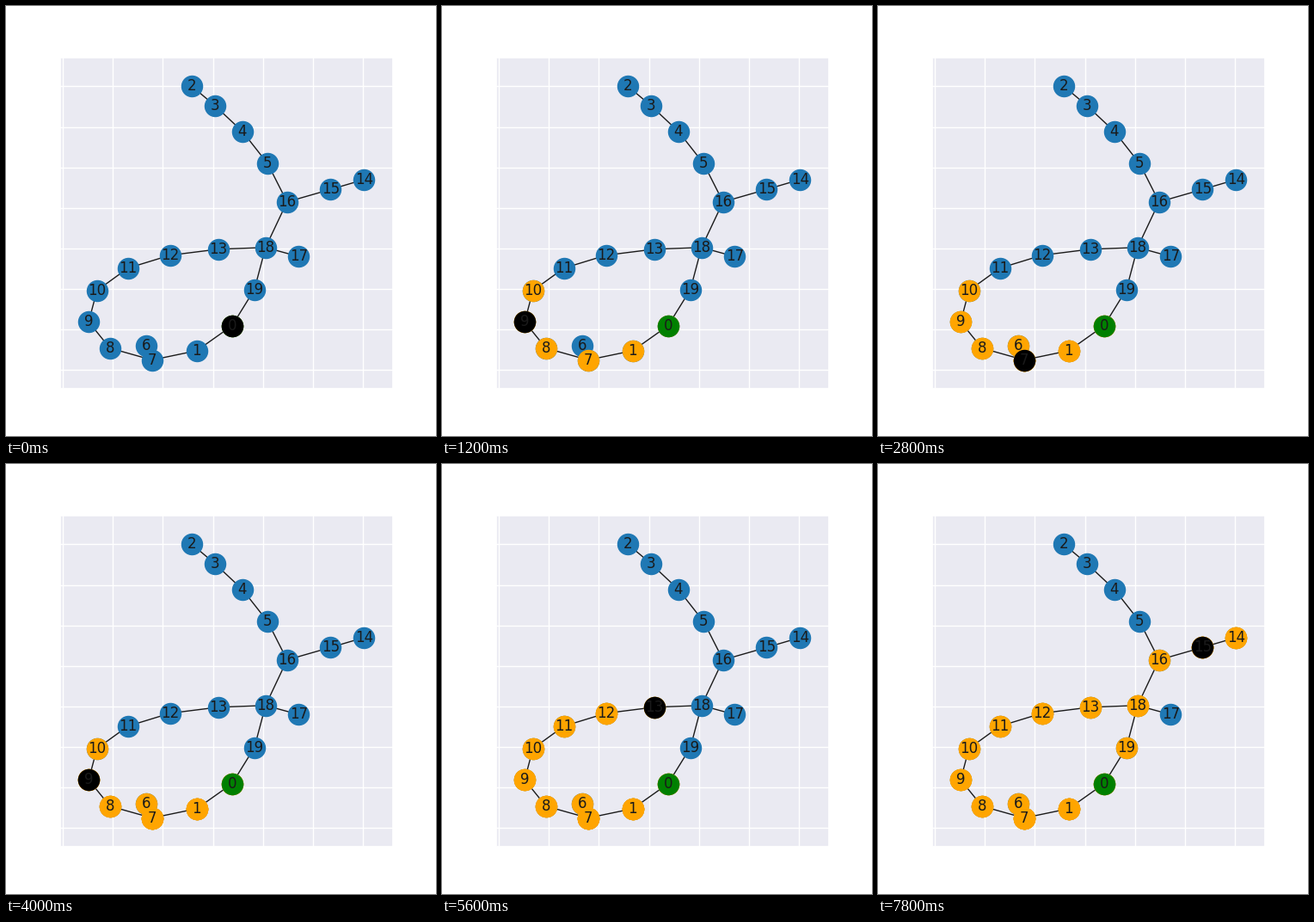
Recreate the animation shown at these times as a matplotlib script. Size 500 by 500 pixels, loop 8000 ms.

```python
import matplotlib.pyplot as plt
import numpy as np
from matplotlib.animation import FuncAnimation

# Graph layout: node centres in stage pixels, y pointing down
NODES = np.array([
    (262.8, 371.8), (221.8, 400.8), (216.3, 93.4), (242.8, 115.8),
    (274.8, 145.8), (304.3, 183.3), (163.3, 395.3), (169.8, 411.6),
    (120.8, 397.8), (96.1, 367.3), (105.8, 330.8), (141.8, 304.8),
    (190.8, 289.8), (246.8, 282.8), (416.4, 201.8), (377.3, 213.3),
    (326.8, 227.8), (340.3, 291.3), (301.8, 280.8), (288.8, 329.8),
])
COUNT = len(NODES)

# Neighbours by number are linked, except after a chain's end
CHAIN_ENDS = {1, 5, 13, 16}
EDGES = [(i, i + 1) for i in range(COUNT - 1) if i not in CHAIN_ENDS]
EDGES += [(0, 19), (1, 7), (5, 16), (13, 18), (16, 18)]

# Nodes where the walker picks a new heading
TURNS = [0, 10, 0, 6, 1, 7, 1, 10, 12, 11, 13, 12, 19, 14, 15, 14, 15, 14, 15]

INK = "#1a1a1a"


def shortest(a, b):
    """Breadth-first path from a to b, without a itself."""
    paths = [[a]]
    seen = {a}
    for path in paths:
        if path[-1] == b:
            return path[1:]
        for edge in EDGES:
            if path[-1] in edge:
                nxt = sum(edge) - path[-1]
                if nxt not in seen:
                    seen.add(nxt)
                    paths.append(path + [nxt])


walk = TURNS[:1]
for a, b in zip(TURNS, TURNS[1:]):
    walk += shortest(a, b)
walk = walk[:40]

plt.rcParams["font.family"] = "DejaVu Sans"
fig = plt.figure(figsize=(5, 5), dpi=100, facecolor="white")
ax = fig.add_axes([0.125, 0.11, 0.775, 0.77], facecolor="#eaeaf2")
ax.set(xlim=(62.5, 450), ylim=(445, 60), xticks=[], yticks=[])
for spine in ax.spines.values():
    spine.set(color="white", linewidth=1.25)

grid = dict(color="white", lw=1, snap=False, zorder=0.5)
for i in range(7):
    ax.axvline(round(66 + 58.2 * i) + 0.5, **grid)
for i in range(8):
    ax.axhline(round(93.45 + 47.1 * i) + 0.5, **grid)

for edge in EDGES:
    ax.plot(*NODES[list(edge)].T, color=INK, lw=1, zorder=1)
for i, (x, y) in enumerate(NODES):
    ax.text(x, y, str(i), size=12, color=INK,
            ha="center", va="center", zorder=3)


def dots(ids, color):
    return ax.scatter(*NODES[ids].T, s=300, color=color, zorder=2)


dots(list(range(COUNT)), "#1f78b4")
visited = dots(walk[:1], "orange")
dots(walk[:1], "green")
walker = dots(walk[:1], "black")


def update(step):
    visited.set_offsets(NODES[walk[:step + 1]])
    walker.set_offsets(NODES[[walk[step]]])
    return visited, walker


anim = FuncAnimation(fig, update, frames=len(walk), interval=200, repeat=True)
plt.show()
```
